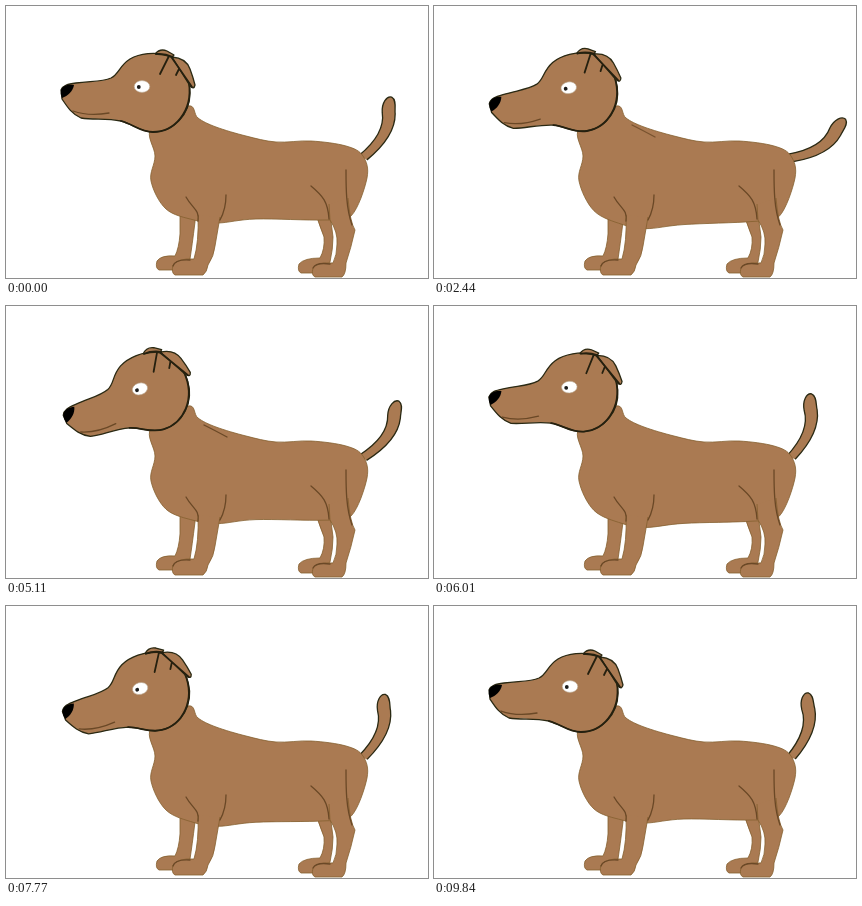
Recreate the animation shown at these times as an HTML page. Size 422 px wide and 272 px high, loop 9870 ms.

```html
<!DOCTYPE html>
<html lang="en">
<head>
<meta charset="utf-8">
<title>Dog</title>
<style>
html, body { margin: 0; width: 100%; height: 100%; overflow: hidden; background: #fff; }
svg { display: block; width: 100vw; height: 100vh; }
.skin { fill: #aa7a52; stroke: #85602f; stroke-width: .8; stroke-linejoin: round; }
.dark { stroke: #2a2913; stroke-width: 1.3; }
.crease { fill: none; stroke: #6a4826; stroke-width: 1.3; stroke-linecap: round; }
.ink { fill: none; stroke: #25200f; stroke-width: 1.8; stroke-linecap: round; }
</style>
</head>
<body>
<svg viewBox="0 0 422 272">
  <path id="tail" class="skin dark" d="M0 -4Q32 9 49 -4C57 -9 66 -8 67 -3C67 3 58 5 54 8Q34 19 0 5"/>

  <!-- far legs -->
  <path class="skin" d="M174 200V228Q173 242 169 250Q155 249 151 255Q149 262 153 264H170L184 253Q186 240 189 216V204"/>
  <path class="skin" d="M306 190Q309 210 318 231Q319 243 314 252Q298 252 293 258Q291 265 295 267H311L324 256Q327 243 327 231L322 192"/>

  <path id="body" class="skin"/>

  <!-- near legs -->
  <path class="skin" d="M192 209Q193 236 188 253Q172 252 167 259Q165 267 169 269H197Q201 266 202 259Q208 250 209 240L214 211"/>
  <path class="skin" d="M323 198L324 214Q332 226 331 238Q331 249 327 257Q311 256 307 262Q305 269 309 271H336Q340 268 340 257Q345 242 349 224Q344 216 342 192"/>
  <path class="crease" d="M167 260Q169 253 184 254M307 262Q310 256 324 258"/>

  <path id="shoulder" class="crease" d="M180 191C186 202 194 204 192 215M220 189Q220 203 214 214"/>
  <path class="crease" d="M305 180C317 190 322 196 323 213M340 164C340 182 340 202 346 219"/>
  <path id="nape" class="crease" d="M198 119Q208 124 221 131"/>

  <g id="head">
    <path class="skin dark" d="M55 84C57 79 62 78 70 77C86 75 96 76 105 72C113 68 113 60 124 53C134 47 150 46 160 49C176 55 184 70 184 87C184 108 168 126 147 126C134 126 127 118 115 115C100 112 88 114 75 112C66 108 62 102 56 93Z"/>
    <path class="ink" d="M183 77C187 106 168 126 147 126C134 126 127 118 115 115"/>
    <path d="M55 84C57 79 62 78 68 79C67 85 62 90 56 92Q54 88 55 84"/>
    <path class="crease" d="M67 105C78 109 92 109 103 107"/>
    <ellipse cx="136" cy="80.5" rx="7.8" ry="5.9" fill="#fff" stroke="#b9a58c" stroke-width=".6"/>
    <circle cx="132.8" cy="81" r="1.9" fill="#1c1c1c"/>
    <path class="skin dark" d="M149 48Q154 42 161 45L168 49L166 51Q157 48 149 48"/>
    <path class="skin dark" d="M166 51Q180 52 184 63Q187 71 189 79Q188 84 184 80Z"/>
    <path class="ink" d="M163 50L154 68M166 52L186 81M173 63L170 69M150 48Q158 47 167 51"/>
  </g>
</svg>
<script>
const LOOP = 9870, NODS = 3, WAG = 1012;
const $ = id => document.getElementById(id);
const place = (id, value) => $(id).setAttribute('transform', value);
const mix = (a, b, k) => a + (b - a) * k;
const clamp = u => Math.min(1, Math.max(0, u));
const ease = u => (u = clamp(u), u * u * (3 - 2 * u));
const bell = (v, mid, width) => Math.exp(-(((v - mid) / width) ** 2));

// Key points of the standing body, clockwise from the nape.
const outline = [[182,100],[192,112],[210,121],[240,130],[270,136],[305,135],[340,140],
  [357,150],[361,172],[345,210],[318,214],[250,213],[212,217],[188,214],[160,203],
  [145,175],[149,150],[145,122]];

// Sniffing tips the trunk forward, drops the neck and draws the withers ahead.
function bend([x, y], dip, breath) {
  const neck = .8 * Math.max(0, 190 - y) * clamp((220 - x) / 45) ** 2;
  const withers = 25 * bell(x, 212, 25) * bell(y, 118, 30);
  const belly = 6 * breath * bell(x, 230, 75) * ease((y - 190) / 20);
  return [
    x - dip * (.44 * neck + withers),
    y + dip * (neck - .2 * (x - 255)) + belly
  ];
}

// Closed smooth curve through the points.
function smooth(pts) {
  const at = i => pts[(i + pts.length) % pts.length];
  const lean = (p, a, b) => a.map((v, k) => v + (b[k] - p[k]) / 6);
  return `M${pts[0]}` + pts.map((a, i) => {
    const b = at(i + 1);
    return `C${lean(at(i - 1), a, b)} ${lean(at(i + 2), b, a)} ${b}`;
  }).join('') + 'Z';
}

function draw(t) {
  const rising = t > 4020;
  const dip = rising ? 1 - ease((t - 4020) / 960) : ease((t - 2680) / 1320);
  const sway = Math.sin(t / LOOP * NODS * Math.PI) ** 2;
  const nod = 17 * sway;
  const breath = Math.sin(t / LOOP * NODS * 2 * Math.PI) ** 2 * (1 - dip);

  $('body').setAttribute('d', smooth(outline.map(p => bend(p, dip, breath))));

  const turn = mix(nod, 63, rising ? dip * dip : dip);
  const x = mix(147 - sway, 110.5, dip), y = mix(86 - sway, 185, dip);
  place('head', `translate(${x} ${y}) rotate(${-turn}) translate(-147 -86)`);

  const lift = 52 + 24 * Math.cos(2 * Math.PI * t / WAG + 1.15);
  place('tail', `translate(356.5 151.5) rotate(${-lift})`);

  place('shoulder', `translate(0 ${12 * dip})`);
  const near = ease((t - 2300) / 200) * (1 - ease((t - 5100) / 250));
  $('nape').setAttribute('opacity', near * Math.max(0, 1 - 4 * dip));
}

const start = performance.now();
function tick() {
  draw((performance.now() - start) % LOOP);
  requestAnimationFrame(tick);
}
tick();
</script>
</body>
</html>
```
